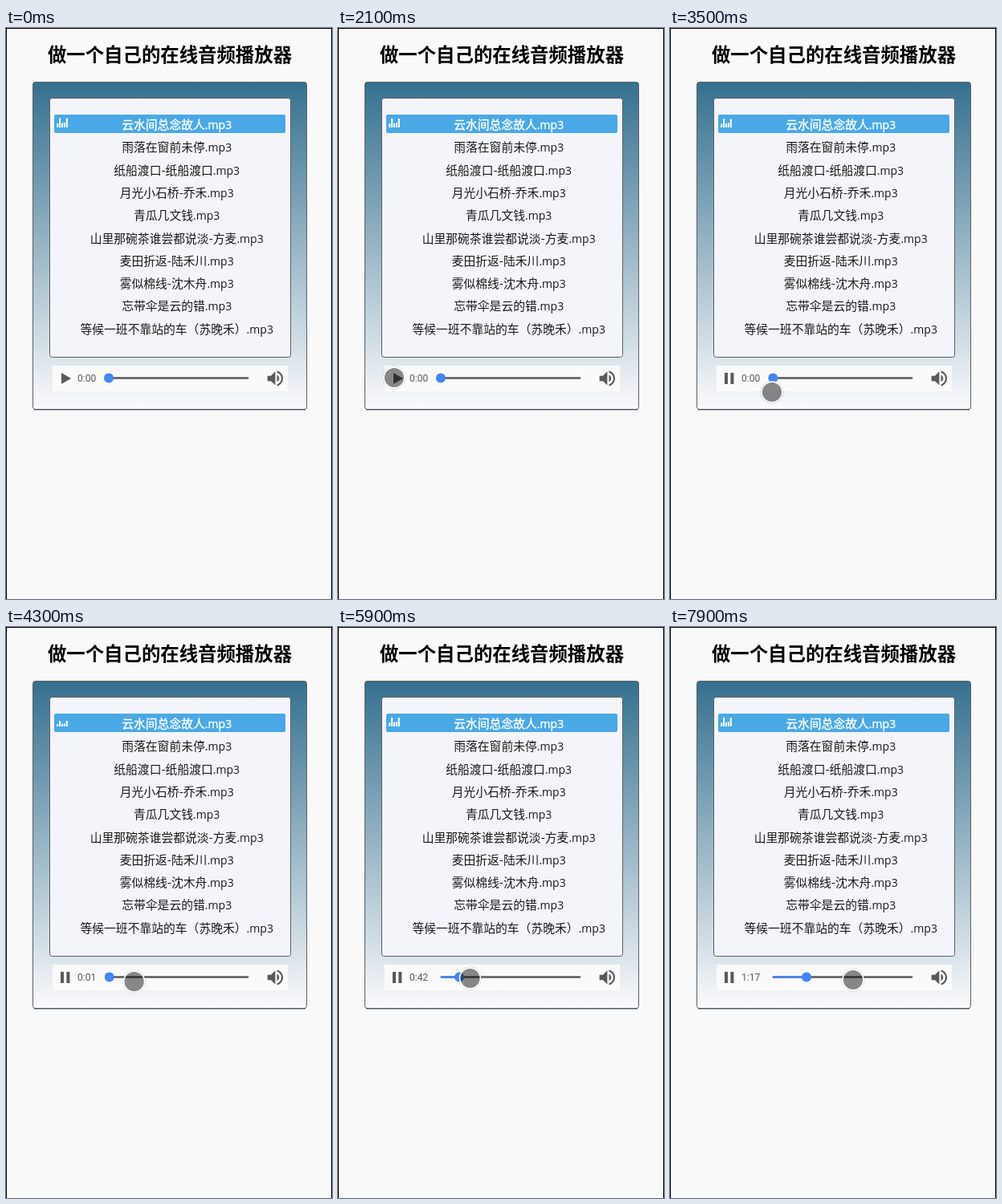
An HTML page for the animation above (8 s loop, 406 px wide and 712 px high).

```html
<!DOCTYPE html>
<html lang="zh-CN">
<head>
<meta charset="utf-8">
<title>在线音频播放器</title>
<style>
html, body { margin: 0; width: 100%; height: 100%; overflow: hidden; background: #f9f9f9; }
svg { display: block; width: 100%; height: 100%; }
text { font-family: "Noto Sans CJK SC", "Noto Sans CJK", sans-serif; text-anchor: middle; }
.row { font-size: 14.8px; fill: #1a1a1a; }
.on { fill: #fff; stroke: #fff; stroke-width: .35px; }
.ext { font: 14px "Open Sans", "Noto Sans", sans-serif; }
#clock { font: 12px Roboto, sans-serif; text-anchor: start; fill: #5a5a5a; }
</style>
</head>
<body>
<svg id="stage" viewBox="0 0 406 712">
  <defs>
    <linearGradient id="sky" x1="0" y1="0" x2="0" y2="1">
      <stop offset="0" stop-color="#35708f"/>
      <stop offset="1" stop-color="#fafafc"/>
    </linearGradient>
  </defs>
  <rect width="406" height="712" fill="#f9f9f9"/>
  <path d="M0 .5H406M.5 0V712M405.5 0V712" stroke="#000"/>
  <text x="204" y="42" font-size="23.4" font-weight="700">做一个自己的在线音频播放器</text>

  <rect x="33.5" y="67.5" width="341" height="408" rx="3" fill="url(#sky)" stroke="#5c5f63"/>
  <path d="M35 475.8H373" stroke="#4c5a64" stroke-width="1.5"/>
  <rect x="54.5" y="87.5" width="300" height="323" rx="3" fill="#f4f5fa" stroke="#5c5f63"/>
  <rect x="60" y="108" width="288" height="23" rx="2" fill="#4aa8e6"/>
  <g id="bars" fill="#fff"></g>
  <g id="list"></g>

  <rect x="58" y="421" width="293" height="32" fill="#fafafa"/>
  <path id="button" fill="#5a5a5a"/>
  <text id="clock" x="89" y="441">0:00</text>
  <g stroke-width="2.6" stroke-linecap="round">
    <path d="M129 436.5H301" stroke="#5a5a5a"/>
    <path id="played" stroke="#4285f4"/>
  </g>
  <circle id="thumb" cy="436.5" r="6" fill="#4285f4"/>
  <path transform="translate(322.4 424) scale(1.08)" fill="#5a5a5a" d="M3 9v6h4l5 5V4L7 9H3zm13.5 3c0-1.77-1.02-3.29-2.5-4.03v8.05c1.48-.73 2.5-2.25 2.5-4.02zM14 3.23v2.06c2.89.86 5 3.54 5 6.71s-2.11 5.85-5 6.71v2.06c4.01-.91 7-4.49 7-8.77s-2.99-7.86-7-8.77z"/>

  <g id="pointer">
    <circle r="14.1" fill="none" stroke="#000" stroke-opacity=".2" stroke-width=".8"/>
    <circle r="12.9" fill="none" stroke="#fff" stroke-width="1.8"/>
    <circle r="12.1" fill="#000" fill-opacity=".46"/>
  </g>
</svg>
<script>
const LOOP = 8000, STEP = 100;
const ENTER_AT = 600, PLAY_AT = 2300;
const TRACK_X = 128, PX_PER_SECOND = 0.545;
const $ = id => document.getElementById(id);

const songs = [
  '云水间总念故人', '雨落在窗前未停', '纸船渡口-纸船渡口', '月光小石桥-乔禾',
  '青瓜几文钱', '山里那碗茶谁尝都说淡-方麦', '麦田折返-陆禾川',
  '雾似棉线-沈木舟', '忘带伞是云的错', '等候一班不靠站的车（苏晚禾）'
];

// Pointer gestures; the pointer rests between them.
const entry = { x: 392, y: 440 };
const moves = [
  { from: ENTER_AT, to: 1000, x: 112, y: 437 },
  { from: 1200, to: 1900, x: 70, y: 436 },
  { from: PLAY_AT, to: 2900, x: 96, y: 511 },
  { from: 3200, to: 3500, x: 127, y: 454 },
  { from: 3500, to: 4400, x: 160, y: 442 },
  { from: 4400, to: 5000, x: 145, y: 440 },
  { from: 5000, to: 5400, x: 151, y: 438 },
  { from: 5800, to: 6000, x: 169, y: 438 },
  { from: 7100, to: 7900, x: 228, y: 440 }
];

// Playback runs on from each of these points.
const seeks = [{ at: 2900, sec: 0 }, { at: 5600, sec: 42 }, { at: 6800, sec: 76 }];

const mix = (a, b, k) => a + (b - a) * k;
const clamp = k => Math.min(1, Math.max(0, k));
const easeOut = k => 1 - (1 - k) ** 2;

function make(tag, parent, attrs, text = '') {
  const el = document.createElementNS('http://www.w3.org/2000/svg', tag);
  for (const name in attrs) el.setAttribute(name, attrs[name]);
  el.textContent = text;
  return parent.appendChild(el);
}

songs.forEach((song, i) => {
  const row = make('text', $('list'),
    { x: 212.7, y: 126 + i * 28.3, class: i ? 'row' : 'row on' }, song);
  make('tspan', row, { class: 'ext' }, '.mp3');
});
const bars = Array.from({ length: 5 }, (_, i) =>
  make('rect', $('bars'), { x: 63.2 + i * 2.9, width: 2 }));

function pointerAt(t) {
  return moves.reduce((p, m) => {
    const k = easeOut(clamp((t - m.from) / (m.to - m.from)));
    return { x: mix(p.x, m.x, k), y: mix(p.y, m.y, k) };
  }, entry);
}

function secondsAt(t) {
  const seek = seeks.filter(s => s.at <= t).pop();
  return seek ? seek.sec + (t - seek.at) / 1000 : 0;
}

function drawBars(t) {
  const dip = Math.sin(Math.PI * t / 345) ** 2;
  bars.forEach((bar, i) => {
    const h = (7.5 + 4 * Math.sin(2.2 * i - 0.7)) * (1 - 0.4 * dip);
    bar.setAttribute('y', 124 - h);
    bar.setAttribute('height', h);
  });
}

function drawPlayer(t) {
  $('button').setAttribute('d', t > PLAY_AT
    ? 'M68 430h4v14h-4zM75.4 430h4v14h-4z'
    : 'M69 430L81 437L69 444z');
  const sec = secondsAt(t), whole = Math.floor(sec);
  const x = TRACK_X + sec * PX_PER_SECOND;
  $('clock').textContent = Math.floor(whole / 60) + ':' + String(whole % 60).padStart(2, '0');
  $('thumb').setAttribute('cx', x);
  $('played').setAttribute('d', `M129 436.5H${Math.max(129, x)}`);
}

function drawPointer(t) {
  const { x, y } = pointerAt(t);
  $('pointer').setAttribute('visibility', t >= ENTER_AT ? 'visible' : 'hidden');
  $('pointer').setAttribute('transform', `translate(${x} ${y})`);
}

const start = performance.now();
function tick() {
  const t = Math.floor((performance.now() - start) % LOOP / STEP) * STEP;
  drawBars(t);
  drawPlayer(t);
  drawPointer(t);
  requestAnimationFrame(tick);
}
tick();
</script>
</body>
</html>
```
